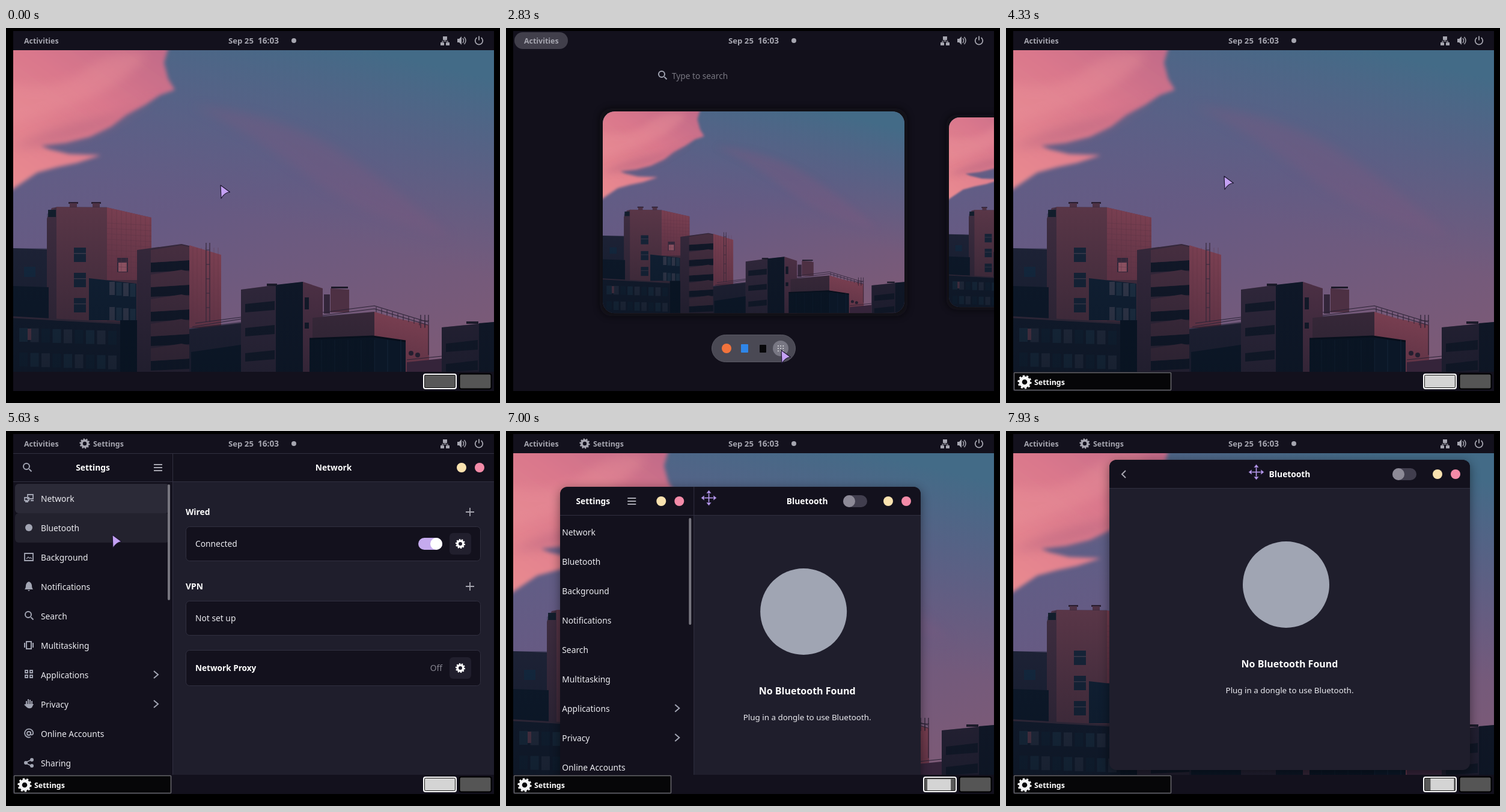
An HTML page that plays this animation: 822x625 px, repeating every 8000 ms.

```html
<!DOCTYPE html>
<html lang="en">
<head>
<meta charset="utf-8">
<title>Desktop tour</title>
<style>
html, body { margin: 0; width: 100%; height: 100%; overflow: hidden; background: #000; }
svg { display: block; width: 822px; height: 625px; }
text { font-family: "Noto Sans", "Open Sans", sans-serif; white-space: pre; }
</style>
</head>
<body>
<svg id="stage" viewBox="0 0 822 625" xmlns="http://www.w3.org/2000/svg"></svg>
<script>
const LOOP = 8000;
const C = {
  bar: '#13111d', page: '#1f1e2c', line: '#313040', text: '#ececf1',
  dim: '#a6a6b0', icon: '#a2a5b3', lilac: '#c4a1f4', yellow: '#f9e2af', pink: '#f38ba8'
};

// ---------- markup helpers ----------
const text = (x, y, s, o = {}) =>
  `<text x="${x}" y="${y}" font-size="${o.size || 13.8}" font-weight="${o.bold ? 700 : 400}" fill="${o.fill || C.text}" text-anchor="${o.anchor || 'start'}">${s}</text>`;
const box = (x, y, w, h, fill, r = 0, more = '') =>
  `<rect x="${x}" y="${y}" width="${w}" height="${h}" rx="${r}" fill="${fill}" ${more}/>`;
const dot = (x, y, r, fill) => `<circle cx="${x}" cy="${y}" r="${r}" fill="${fill}"/>`;
const poly = (fill, pts) => `<polygon fill="${fill}" points="${pts}"/>`;
const line = (d, stroke, w = 2, more = '') =>
  `<path d="${d}" fill="none" stroke="${stroke}" stroke-width="${w}" ${more}/>`;
const group = (id, body, more = '') => `<g id="${id}" ${more}>${body}</g>`;
const at = (x, y, body) => `<g transform="translate(${x} ${y})">${body}</g>`;
const gear = (x, y, r, fill) => at(x, y,
  `<circle r="${r * .6}" fill="none" stroke="${fill}" stroke-width="${r * .45}"/>` +
  `<circle r="${r * .86}" fill="none" stroke="${fill}" stroke-width="${r * .3}" pathLength="20" stroke-dasharray="1 1"/>`);
const lens = (x, y) => at(x, y, line('M3.5 3.5L7.5 7.5', C.icon) +
  `<circle cx="-1" cy="-1" r="5" fill="none" stroke="${C.icon}" stroke-width="2"/>`);
const menu = (x, y) => line(`M${x - 7} ${y - 5}h14m-14 5h14m-14 5h14`, C.dim);
const plus = (x, y) => line(`M${x - 7} ${y}h14m-7 -7v14`, C.dim, 1.8);
const chevron = (x, y) => line(`M${x - 4} ${y - 6}l7 6l-7 6`, C.icon, 2);
const buttons = x => dot(x - 54, 24, 8, C.yellow) + dot(x - 24, 24, 8, C.pink);

// ---------- wallpaper ----------
function sky() {
  return box(12, 37, 800, 536, 'url(#sky)') + box(12, 37, 800, 536, 'url(#teal)') +
    '<path d="M310 130Q460 140 570 215T740 350Q600 320 500 245T310 130Z" fill="#7d587f" opacity=".35" filter="url(#haze)"/>' +
    '<path d="M0 20H274L263 58L270 85L281 103L256 112L232 128L200 145L175 164L140 181L100 191L58 196L72 202L105 210L158 212L118 225L85 232L52 241L0 276Z" fill="url(#cloud)" filter="url(#soft)"/>' +
    '<path d="M10 200Q70 165 150 150T270 95L235 125L165 168L105 189L55 197Z" fill="#b4627f" opacity=".45" filter="url(#haze)"/>' +
    '<path d="M0 90Q80 110 130 70T235 45Q190 100 120 125T0 165Z" fill="#ee969b" opacity=".35" filter="url(#haze)"/>';
}

function buildings() {
  const dark = '#0f1b2d';
  // left tower
  let s = poly('#25283e', '12,367 71,369 71,573 12,573') + box(30, 398, 19, 17, '#18304a');
  s += poly('#4b3347', '68,318 76,300 87,298 87,573 68,573') + poly('#6b3e50', '84,298 168,299 168,573 84,573');
  s += poly('#5c384a', '168,299 242,316 242,573 168,573') + poly('url(#lit)', '168,299 242,316 242,420 168,420');
  for (const x of [104, 142]) s += box(x, 290, 16, 3, '#2a1e30') + box(x + 2, 292, 12, 7, '#4d3144');
  s += box(70, 303, 13, 12, '#15202f');
  for (const y of [366, 408, 450]) s += box(113, y, 20, 24, '#1b2a40') + box(113, y + 9, 20, 1.5, '#51495c');
  s += box(185, 383, 18, 24, '#31273a') + box(187, 391, 14, 15, '#8a5060');
  for (let x = 176; x < 242; x += 8) s += line(`M${x} ${302 + (x - 176) * .23}V420`, '#5a3346', .4);
  for (let y = 325; y < 420; y += 9) s += line(`M168 ${y}l74 4`, '#5a3346', .4);
  s += poly('#14253b', '138,417 217,426 217,487 138,487');
  for (let i = 0; i < 4; i++) for (const y of [423, 465]) s += box(172 + i * 11.5, y + i, 9, 22, i % 2 ? '#273c52' : '#46495e');
  s += poly(dark, '12,430 71,432 71,490 12,485') + poly('#171f32', '12,484 190,492 190,573 12,573');
  s += line('M12 482L190 492', '#4a3548', 3) + box(190, 487, 28, 86, '#0a1626');
  for (let i = 0; i < 9; i++) for (const y of [500, 541])
    s += box(22 + i * 18.5, y + i * .6, 14, 23, ['#20354a', '#15263a', '#30374b'][(i * 2 + (y > 520)) % 3]);
  s += box(36, 501, 6, 19, '#77475a');
  // balconies
  s += poly('#463045', '218,370 292,360 305,363 305,573 218,573') + poly('url(#lit)', '305,362 358,378 358,500 305,500');
  for (let y = 387; y < 570; y += 41) {
    s += poly('#151a2b', `241,${y + 4} 305,${y} 305,${y + 17} 241,${y + 20}`);
    s += poly('#5e394c', `241,${y - 17} 292,${y - 25} 305,${y - 22} 305,${y} 241,${y + 4}`);
  }
  for (let x = 311; x < 358; x += 7) s += line(`M${x} 366V495`, '#5d3346', .4);
  s += line('M333 358V490M339 358V490M333 370h6m-6 24h6m-6 24h6m-6 24h6m-6 24h6', '#34283a', 1.2);
  s += poly('#2f2a40', '305,502 391,492 391,573 305,573') + poly(dark, '308,540 391,528 391,573 308,573');
  s += line('M310 498L391 485M315 492L391 482', '#2a2438', 1.2);
  // middle block
  s += poly('#47334a', '391,436 450,428 450,573 391,573') + poly('#131b2d', '449,428 494,423 494,573 449,573');
  s += poly('#74415a', '494,423 527,434 527,573 494,573') + box(434, 426, 17, 4, '#1c1b2a');
  for (const y of [458, 498, 540]) s += poly('#191d2e', `398,${y + 2} 447,${y - 3} 447,${y + 12} 398,${y + 16}`);
  s += box(497, 449, 7, 20, '#191d2e') + box(497, 491, 7, 10, '#191d2e');
  // right roofs
  s += poly('#4d3043', '540,434 571,436 571,474 540,474') + box(541, 431, 28, 3, '#1d1a29');
  s += box(529, 444, 10, 32, '#33263a');
  s += poly('#5c394c', '510,483 613,473 613,573 510,573') + poly('url(#lit)', '613,473 651,484 704,495 704,573 613,573');
  s += line('M527 474L613 463L702 490M527 479L613 468L702 495', '#2b2235', 1.2);
  for (let x = 616; x < 702; x += 9) s += line(`M${x} ${464 + (x - 613) * .3}v9`, '#2b2235', 1);
  s += poly('#0b1727', '505,518 610,513 665,522 665,573 505,573') + line('M505 518L610 514L665 522', '#070e1a', 3);
  for (let x = 525; x < 660; x += 22) s += line(`M${x} 520V573`, '#16263a', 1);
  s += line('M690 478V500M697 478V500M703 478V545M690 488h14', '#2b2235', 1.2);
  s += poly('#35243a', '667,557 725,551 725,573 667,573') + line('M667 553L725 547', '#2b2235', 1.2);
  s += dot(674, 542, 4, '#241f30') + dot(685, 545, 4, '#241f30');
  s += poly('#3a2c42', '725,499 787,493 787,573 725,573') + poly('#161b2c', '787,492 812,490 812,573 787,573');
  s += box(766, 489, 20, 4, '#1c1b2a');
  for (const y of [523, 557]) s += poly('#191c2d', `732,${y + 3} 785,${y - 3} 785,${y + 13} 732,${y + 17}`);
  // evening shade on the walls away from the light
  s += poly('url(#shade)', '12,367 68,367 68,310 84,298 168,298 168,420 218,420 218,370 292,360 305,363 305,500 391,490 391,436 494,423 527,434 527,480 613,473 613,573 12,573');
  return s + poly('url(#shade)', '725,499 812,490 812,573 725,573');
}

// ---------- settings window ----------
const ROWS = ['Network', 'Bluetooth', 'Background', 'Notifications', 'Search', 'Multitasking',
  'Applications', 'Privacy', 'Online Accounts', 'Sharing'];
const k = C.icon;
const ROW_ICONS = [
  line('M-2 -6h9v7h-9zM-7 -1h7v5h-7zM-6 6h5M3 4h5', k, 1.8),
  dot(0, 0, 6, k),
  line('M-7 -6h14v12h-14z', k, 1.8) + line('M-4 3l3 -3l2 2l2 -1l2 2', k, 1.2),
  `<path d="M-7 5Q-5 3 -5 -2Q-4 -7 0 -8Q4 -7 5 -2Q5 3 7 5ZM-2 6h4l-2 2z" fill="${k}"/>`,
  lens(0, -1),
  line('M-4 -6h8v12h-8zM-7 -4v8M7 -4v8', k, 2),
  line('M-6 -7h4v4h-4zM2 -7h4v4h-4zM-6 1h4v4h-4zM2 1h4v4h-4z', k, 1.8),
  line('M-4 -5V2M-1 -8V2M2 -7V2M5 -5V2', k, 2) + `<path d="M-5 0H6L8 0L5 6Q0 9 -4 5L-8 1Z" fill="${k}"/>`,
  `<circle r="3" fill="none" stroke="${k}" stroke-width="1.8"/>` + line('M3 -3V1Q4 4 7 1A7 7 0 1 0 3 6', k, 1.8),
  line('M6 -6L-6 0L6 6', k, 1.8) + dot(5, -5, 3, k) + dot(-5, 0, 3, k) + dot(5, 5, 3, k)
];
const bold = (x, y, s, anchor = 'middle', size = 13.8) => text(x, y, s, { bold: 1, anchor, size, fill: '#fff' });

function sidebar() {
  let s = box(0, 0, 265, 600, C.bar) + group('rowSel', box(3, 51, 257, 49, '#2b2a37', 6)) + group('rowHover', box(3, 51, 257, 49, '#23222e', 6));
  s += group('rowIcons', ROWS.map((r, i) => at(26, 75 + 49 * i, ROW_ICONS[i])).join(''));
  ROWS.forEach((r, i) => s += text(46, 81 + 49 * i, r));
  s += chevron(238, 369) + chevron(238, 418);
  s += `<rect id="scroll" x="257" y="52" width="4" rx="2" fill="#77767f"/>`;
  s += group('headWide', lens(23, 23) + bold(132.5, 29, 'Settings') + menu(241, 24));
  s += group('headSlim', bold(97.5, 29, 'Settings') + menu(162, 24) + buttons(265));
  return s;
}
const card = (y, h) => box(299.5, y + .5, 490, h, C.bar, 6, `stroke="${C.line}"`);
const gearButton = y => box(738, y - 18, 36, 36, '#211f2d', 6) + gear(756, y, 8, '#fff');
const networkPage = () =>
  bold(299, 140, 'Wired', 'start') + plus(772, 135) + card(159, 57) + text(315, 193, 'Connected') +
  box(686, 178, 40, 20, '#c5aaee', 10) + dot(716, 188, 10, '#fff') + gearButton(188) +
  bold(299, 264, 'VPN', 'start') + plus(772, 259) + card(283, 57) + text(315, 317, 'Not set up') +
  card(365, 59) + bold(315, 400, 'Network Proxy', 'start', 13.6) + text(726, 400, 'Off', { fill: '#85848f', anchor: 'end' }) + gearButton(395);
const bluetoothPage = () =>
  dot(-6, 208, 72, '#a0a5b3') + bold(0, 346, 'No Bluetooth Found', 'middle', 16) +
  text(0, 389, 'Plug in a dongle to use Bluetooth.', { size: 13.4, anchor: 'middle' });

function settingsWindow() {
  const inner = group('side', sidebar()) +
    group('content', `<rect width="800" height="600" fill="${C.page}"/>` + box(0, 0, 800, 47, C.bar)) +
    group('divider', line('M0 0V600', C.line, 1)) + line('M0 47.5H800', C.line, 1) +
    group('netPage', networkPage(), 'transform="translate(-12 -37)"') + group('netTitle', bold(533, 29, 'Network')) +
    group('btPage', bluetoothPage()) + group('btTitle', bold(0, 29, 'Bluetooth')) +
    group('btSwitch', box(-129, 14, 40, 20, '#413e4e', 10) + dot(-119, 24, 10, '#8d8a97')) +
    group('back', line('M27 18l-6 6l6 6', C.dim, 2)) + group('winButtons', buttons(0)) +
    group('topEdge', line('M0 .5H800', C.line, 1));
  return '<rect id="winShadow" fill="#000" opacity=".45" filter="url(#haze)"/>' +
    `<g clip-path="url(#winClip)">${inner}</g>`;
}

// ---------- shell ----------
const barLabel = (x, s) => text(x, 25.5, s, { bold: 1, size: 12.4, fill: C.dim });
const topBar = () => box(12, 5, 800, 32, C.bar) +
  group('pill', box(14, 7, 89, 28, '#413f4b', 14)) + barLabel(30, 'Activities') +
  group('appMenu', gear(131, 21, 8.5, C.dim) + barLabel(145, 'Settings')) +
  text(370, 26, 'Sep 25', { bold: 1, size: 13.2, fill: C.dim }) + text(419, 26, '16:03', { bold: 1, size: 13.6, fill: C.dim }) + dot(479, 21, 4, C.dim) +
  box(727, 14, 7, 6, C.dim) + box(723, 24, 6, 5, C.dim) + box(732, 24, 6, 5, C.dim) + line('M730.5 19v3M726 25v-3h9v3', C.dim, 1.2) +
  `<path d="M751 18h3l4 -4v14l-4 -4h-3z" fill="${C.dim}"/>` + line('M760 17q3 4 0 8M762.5 15q5 6 0 12', C.dim, 1.5) +
  line('M783.5 16A6.3 6.3 0 1 0 790.5 16M787 13.5v7', C.dim, 1.8);

const taskBar = () => box(12, 573, 800, 32, C.bar) +
  group('task', box(13.5, 574.5, 261, 29, '#060608', 1, 'stroke="#65656a" stroke-width="1.6"') +
    gear(31, 590, 11.5, '#f4f4f4') + text(47, 595, 'Settings', { bold: 1, size: 12.4, fill: '#fff' })) +
  box(695, 577, 54, 24, '#585858', 3, 'stroke="#fff" stroke-width="2"') +
  '<rect id="thumb" fill="#d4d4d4"/>' + box(696.5, 578.5, 51, 21, 'none', 2, 'stroke="#111"') +
  box(754.5, 576.5, 53, 25, '#555', 3, 'stroke="#000" stroke-width="2"');

function overview() {
  const tiles = ['#6d7690', '#8b6f8f', '#5d8090', '#f0f0f0', '#90846d', '#6d9080', '#907070', '#7070a0', '#808890', '#607088'];
  let apps = '';
  tiles.forEach((c, i) => {
    const x = 150 + i % 5 * 131, y = 285 + (i / 5 | 0) * 120;
    apps += i === 3 ? gear(x, y, 24, c) + text(x, y + 44, 'Settings', { size: 11.5, anchor: 'middle' })
      : box(x - 22, y - 22, 44, 44, c, 10);
  });
  const nine = [0, 1, 2].flatMap(i => [0, 1, 2].map(j => box(452 + i * 4.2, 529 + j * 4.2, 1.8, 1.8, '#d6d6da'))).join('');
  return group('search', lens(260, 78) + text(276, 85, 'Type to search', { fill: '#787781', size: 13.7 })) + group('apps', apps) +
    group('dash', box(342.5, 511.5, 139, 45, '#4a4954', 23, 'stroke="#5a5964"') + dot(367, 534, 8, '#f2733c') +
      box(391, 527, 12, 14, '#2f86e8', 1) + box(422, 528, 11, 13, '#08080a', 1) +
      group('dashHover', dot(457, 534, 13, '#787783')) + nine);
}
const view = id => group(id, `<rect x="-8" y="-8" width="816" height="552" rx="30" fill="#08070d" opacity=".6" filter="url(#haze)"/>` +
  `<g clip-path="url(#${id}Clip)"><use href="#wall" transform="translate(-12 -37)"/></g>`);
const viewClip = id => `<clipPath id="${id}Clip"><rect id="${id}Round" width="800" height="536"/></clipPath>`;
const arm = a => `<g transform="rotate(${a})"><path d="M0 0V-8" stroke="#b99cf0" stroke-width="1.6"/><path d="M0 -13L4.5 -7.5H-4.5Z" fill="#b99cf0" stroke="#221a35" stroke-width=".8"/></g>`;

document.getElementById('stage').innerHTML = `<defs>
  <linearGradient id="sky" x1=".3" y1="0" x2=".7" y2="1"><stop offset="0" stop-color="#5c6088"/><stop offset=".45" stop-color="#665a83"/><stop offset="1" stop-color="#7b5a77"/></linearGradient>
  <linearGradient id="teal" x1=".75" y1="0" x2=".55" y2=".55"><stop offset="0" stop-color="#436b87"/><stop offset="1" stop-color="#5a5f86" stop-opacity="0"/></linearGradient>
  <linearGradient id="cloud" x1=".9" y1="0" x2=".1" y2="1"><stop offset="0" stop-color="#c06a88"/><stop offset=".4" stop-color="#d9778c"/><stop offset="1" stop-color="#e98a90"/></linearGradient>
  <linearGradient id="lit" x1=".7" y1="0" x2=".5" y2="1"><stop offset="0" stop-color="#7c4052"/><stop offset="1" stop-color="#5c3244"/></linearGradient>
  <linearGradient id="shade" gradientUnits="userSpaceOnUse" x1="0" y1="298" x2="0" y2="573"><stop offset="0" stop-color="#08121f" stop-opacity=".18"/><stop offset="1" stop-color="#08121f" stop-opacity=".6"/></linearGradient>
  <filter id="soft"><feGaussianBlur stdDeviation="3"/></filter>
  <filter id="haze" x="-30%" y="-30%" width="160%" height="160%"><feGaussianBlur stdDeviation="9"/></filter>
  <clipPath id="screen"><rect x="12" y="5" width="800" height="600"/></clipPath>
  <clipPath id="winClip"><rect id="winRound"/></clipPath>
  ${viewClip('viewA')}${viewClip('viewB')}${group('wall', sky() + buildings())}</defs>
  <rect width="822" height="625"/>
  <g clip-path="url(#screen)">${box(12, 5, 800, 600, '#12101b')}${overview()}${view('viewB')}${view('viewA')}
  ${group('win', settingsWindow())}${topBar()}${group('taskBar', taskBar())}
  ${group('pointer', `<path d="M0 0L15.5 11.5Q7 12 1 22Z" fill="${C.lilac}" stroke="#1d1630" stroke-width="1.2" stroke-linejoin="round"/>`)}
  ${group('mover', [0, 90, 180, 270].map(arm).join(''))}</g>`;

// ---------- motion ----------
const el = {};
document.querySelectorAll('#stage [id]').forEach(n => el[n.id] = n);
const set = (id, attrs) => { for (const a in attrs) el[id].setAttribute(a, attrs[a]); };
const move = (id, x, y, s = 1) => set(id, { transform: `translate(${x} ${y}) scale(${s})` });
const show = (id, on) => set(id, { opacity: +on });
const lerp = (a, b, p) => a + (b - a) * p;
const ramp = (t, a, b) => Math.min(1, Math.max(0, (t - a) / (b - a)));
const easeOut = p => 1 - (1 - p) ** 3;

// Each key is [time, x, y].
function along(keys, t) {
  let i = 0;
  while (i < keys.length - 2 && t >= keys[i + 1][0]) i++;
  const [a, b] = [keys[i], keys[i + 1]], p = ramp(t, a[0], b[0]);
  return [lerp(a[1], b[1], p), lerp(a[2], b[2], p)];
}
const POINTER = [[30, 357, 262], [220, 348, 292], [400, 320, 299], [620, 272, 262], [830, 207, 194], [870, 172, 165],
  [1769, 172, 165], [1770, 107, 165], [1950, 150, 230], [2250, 350, 430], [2530, 452, 518], [2790, 452, 518], [2800, 458, 537],
  [2900, 458, 537], [3250, 500, 410], [3600, 543, 288], [3630, 543, 288], [4330, 363, 247], [4400, 361, 246],
  [4940, 361, 246], [5250, 270, 215], [5630, 177, 173], [5770, 175, 171], [6100, 250, 120], [6530, 342, 56],
  [6799, 342, 56], [6800, 341, 61], [7000, 337.5, 111.5], [7400, 337.5, 111.5], [7700, 428, 84], [7930, 416.5, 68.5]];
const WINDOW = [[6800, 94, 43], [7000, 90, 93], [7400, 90, 93], [7700, 184, 64], [7930, 172, 48]];

// Each view is [x, y, scale, corner radius].
const DESK = [[12, 37, 1, 0], [850, 37, 1, 0]];
const OVER = [[161, 139, .6275, 20], [737, 149, .59, 18]];
const GRID = [[340, 115, .16, 5], [484, 115, .16, 5]];

function drawShell(t, x, y) {
  const inOver = t >= 1770 && t < 3950;
  const toGrid = easeOut(ramp(t, 2870, 3150)), leave = easeOut(ramp(t, 3630, 3950));
  ['viewA', 'viewB'].forEach((id, i) => {
    const p = DESK[i].map((d, j) => inOver ? lerp(lerp(OVER[i][j], GRID[i][j], toGrid), d, leave) : d);
    move(id, p[0], p[1], p[2]);
    set(id + 'Round', { rx: p[3] / p[2] });
  });
  const seen = inOver ? 1 - leave : 0;
  show('search', seen);
  show('dash', seen);
  show('apps', seen * toGrid);
  show('pill', inOver && t < 3630);
  show('dashHover', Math.hypot(x - 457, y - 534) < 13);
  show('taskBar', !inOver);
  show('task', t >= 4100);
  show('thumb', t >= 4100);
  show('appMenu', t >= 4400);
}

function drawWindow(t, px, py) {
  const open = t >= 4470, free = t >= 6800, onBt = t >= 5770;
  const [x, y] = free ? along(WINDOW, t) : [12, 37];
  const w = free ? 600 : 800, h = free ? 517 : 536, r = free ? 12 : 0;
  const side = 265 * (1 - ramp(t, 6957, 7230)), mid = (side + w) / 2;
  set('win', { display: open ? 'inline' : 'none' });
  move('win', x, y);
  set('winRound', { width: w, height: h, rx: r });
  set('winShadow', { y: 4, width: w, height: h, rx: r });
  move('side', side - 265, 0);
  move('content', side, 0);
  move('divider', side + .5, 0);
  show('divider', side > 0);
  set('scroll', { height: free ? 178 : 193 });
  show('headWide', !free);
  show('headSlim', free);
  show('topEdge', !free);
  show('rowIcons', !free);
  show('netPage', !onBt);
  show('netTitle', !onBt);
  for (const id of ['btPage', 'btTitle', 'btSwitch']) show(id, onBt);
  move('btPage', mid, (h - 517) / 2);
  move('btTitle', mid, 0);
  move('btSwitch', w, 0);
  move('winButtons', w, 0);
  show('back', side === 0);
  const row = Math.floor((py - 88) / 49), sel = onBt ? 1 : 0;
  move('rowSel', 0, 49 * sel);
  show('rowSel', !free);
  move('rowHover', 0, 49 * row);
  show('rowHover', !free && px > 15 && px < 272 && row >= 0 && row < 10 && row !== sel);
  const kx = 52 / 800, ky = 22 / 536;
  set('thumb', { x: 696 + (x - 12) * kx, y: 578 + (y - 37) * ky, width: w * kx, height: Math.min(h * ky, 22 - (y - 37) * ky) });
}

function draw(t) {
  const [x, y] = along(POINTER, t);
  drawShell(t, x, y);
  drawWindow(t, x, y);
  const dragging = t >= 6800;
  move('pointer', x, y);
  move('mover', x, y);
  show('pointer', !dragging);
  show('mover', dragging);
}

const start = performance.now();
function tick() {
  draw((performance.now() - start) % LOOP);
  requestAnimationFrame(tick);
}
draw(0);
requestAnimationFrame(tick);
</script>
</body>
</html>
```
